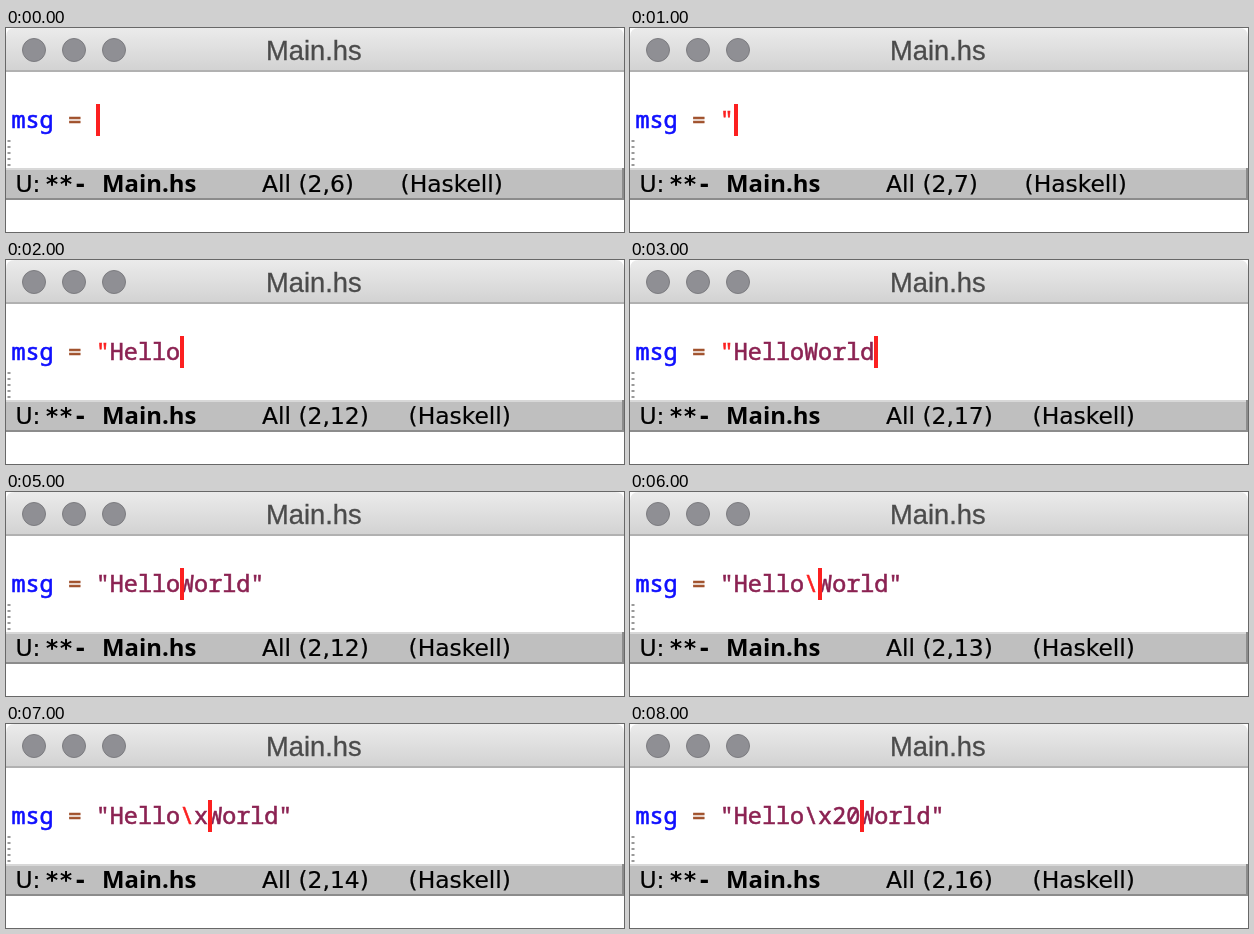
Animation, 618 px wide and 204 px high, one loop 9000 ms. Source, as an HTML page:

```html
<!DOCTYPE html>
<html lang="en">
<head>
<meta charset="utf-8">
<title>Main.hs</title>
<style>
  html, body { margin: 0; width: 100%; height: 100%; overflow: hidden; background: #fff; }
  svg { display: block; }
  text { white-space: pre; }
  text, tspan { fill: currentColor; stroke: currentColor; }
  .title { font: 27.3px "Liberation Sans", Arial, sans-serif; color: #4b4b4b; stroke-width: .3; }
  .code { font: 23.42px "Noto Sans Mono", monospace; stroke-width: .6; }
  .mode { font: 23.4px "DejaVu Sans", sans-serif; stroke-width: .2; }
  .flags { font: bold 23.4px "DejaVu Sans Mono", monospace; stroke: none; }
  .file { font: bold 23.9px "Noto Sans", sans-serif; stroke: none; }
</style>
</head>
<body>
<svg width="618" height="204" viewBox="0 0 618 204">
  <defs>
    <linearGradient id="bar" x2="0" y2="1">
      <stop stop-color="#ebebeb"/>
      <stop offset="1" stop-color="#d2d2d2"/>
    </linearGradient>
  </defs>
  <path d="M0 43V9Q0 0 9 0H609Q618 0 618 9V43Z" fill="url(#bar)"/>
  <path d="M0 43H618" stroke="#b1b1b1" stroke-width="2"/>
  <g fill="#8f8f94" stroke="#7c7c80">
    <circle cx="28" cy="22" r="11.5"/>
    <circle cx="68" cy="22" r="11.5"/>
    <circle cx="108" cy="22" r="11.5"/>
  </g>
  <text class="title" x="260" y="32">Main.hs</text>

  <text class="code" x="5.5" y="100"><tspan color="#1010ff">msg</tspan> <tspan color="#a0522d">=</tspan> <tspan id="quote">"</tspan><tspan id="head" color="#8b2252"></tspan><tspan id="slash">\</tspan><tspan id="tail" color="#8b2252"></tspan></text>
  <rect id="cursor" y="76" width="4" height="32" fill="#fc2020"/>
  <path d="M3 112V139" stroke="#999" stroke-width="3" stroke-dasharray="2 4"/>

  <rect y="140" width="618" height="32" fill="#bfbfbf"/>
  <path d="M0 141H618" stroke="#d8d8d8" stroke-width="2"/>
  <path d="M0 171H617V140" fill="none" stroke="#8c8c8c" stroke-width="2"/>
  <text class="mode" x="9.5" y="164">U:</text>
  <text class="flags" x="39" y="164">**-</text>
  <text class="file" x="96" y="164">Main.hs</text>
  <text class="mode" id="position" x="256" y="164"></text>
  <text class="mode" id="language" y="164">(Haskell)</text>
</svg>
<script>
  const RED = "#fc2020", STRING = "#8b2252";
  const STEP = 1000, CELL = 14.05;
  // typed text, cursor column, colour of the part the parser rejects
  const states = [
    { text: "", column: 6 },
    { text: '"', column: 7, quote: RED },
    { text: '"Hello', column: 12, quote: RED },
    { text: '"HelloWorld', column: 17, quote: RED },
    { text: '"HelloWorld"', column: 18 },
    { text: '"HelloWorld"', column: 12 },
    { text: '"Hello\\World"', column: 13, slash: RED },
    { text: '"Hello\\xWorld"', column: 14, slash: RED },
    { text: '"Hello\\x20World"', column: 16 }
  ];
  const byId = id => document.getElementById(id);
  const [quote, head, slash, tail, cursor, position, language] =
    ["quote", "head", "slash", "tail", "cursor", "position", "language"].map(byId);

  function setText(span, text, color = STRING) {
    span.textContent = text;
    span.setAttribute("color", color);
  }

  function render(time) {
    const state = states[Math.floor(time / STEP) % states.length];
    const [before, after] = state.text.slice(1).split("\\");
    setText(quote, state.text.slice(0, 1), state.quote);
    setText(head, before);
    setText(slash, after === undefined ? "" : "\\", state.slash);
    setText(tail, after || "");
    cursor.setAttribute("x", Math.floor(90 + (state.column - 6) * CELL));
    position.textContent = `All (2,${state.column})`;
    language.setAttribute("x", state.column < 10 ? 394.5 : 402.5);
  }

  const start = performance.now();
  function tick() {
    render(performance.now() - start);
    requestAnimationFrame(tick);
  }
  tick();
</script>
</body>
</html>
```
